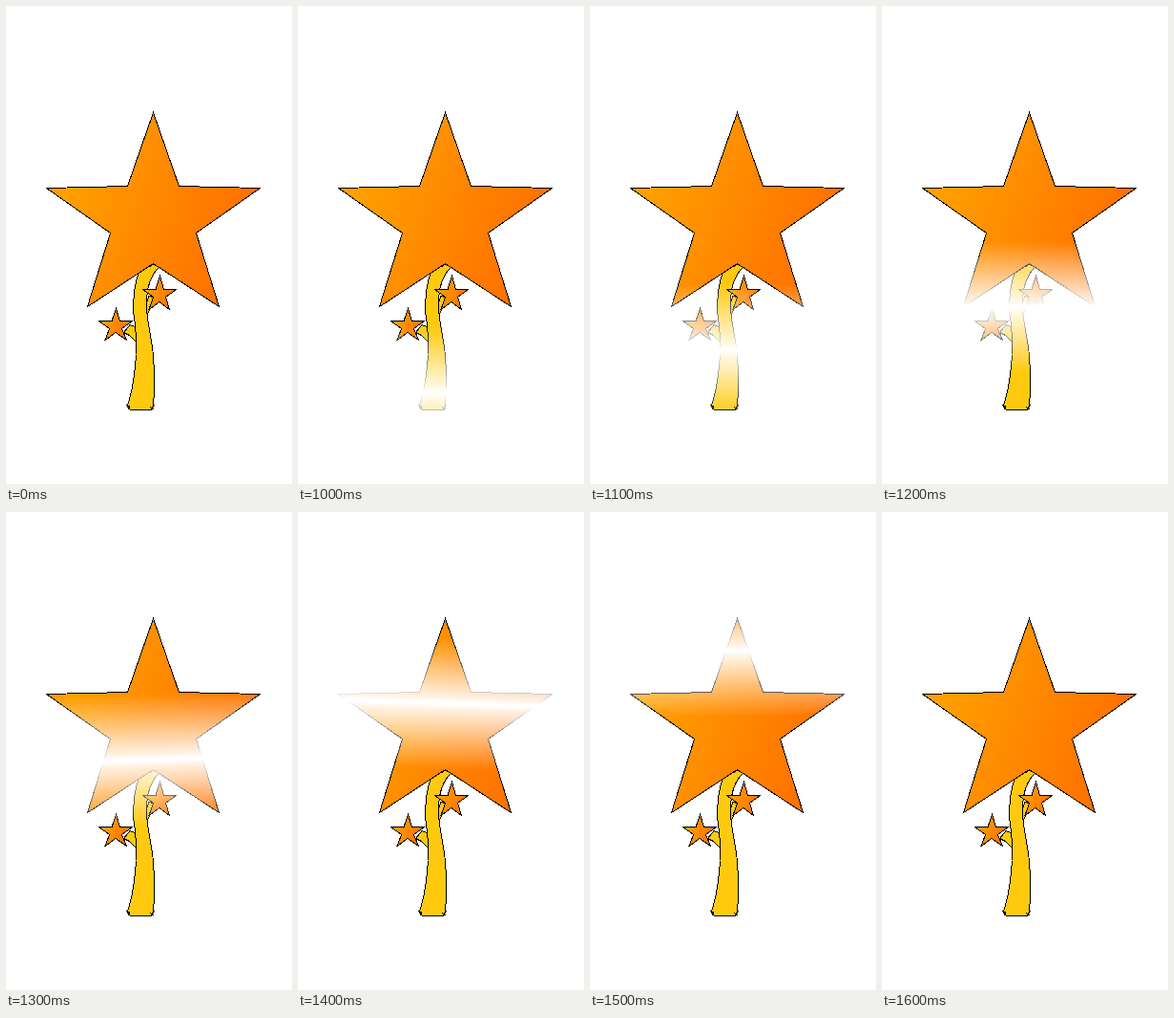
Animation, 300 px wide and 500 px high, one loop 1700 ms. Source, as an HTML page:

```html
<!DOCTYPE html>
<html lang="en">
<head>
<meta charset="utf-8">
<title>Star tree</title>
<style>
  html, body { margin: 0; width: 100%; height: 100%; overflow: hidden; background: #fff; }
  svg { display: block; width: 300px; height: 500px; }
  .ink { stroke: #000; stroke-width: 1; shape-rendering: crispEdges; }
</style>
</head>
<body>
<svg viewBox="0 0 300 500">
  <defs>
    <linearGradient id="orange" x1=".09" y1=".36" x2=".875" y2=".61">
      <stop offset="0" stop-color="#ffa000"/>
      <stop offset="1" stop-color="#ff7300"/>
    </linearGradient>
    <linearGradient id="shine" x1="0" y1="0" x2="0" y2="1">
      <stop offset="0" stop-color="#fff" stop-opacity="0"/>
      <stop offset=".46" stop-color="#fff" stop-opacity=".9"/>
      <stop offset=".49" stop-color="#fff"/>
      <stop offset=".51" stop-color="#fff"/>
      <stop offset=".54" stop-color="#fff" stop-opacity=".9"/>
      <stop offset="1" stop-color="#fff" stop-opacity="0"/>
    </linearGradient>
  </defs>

  <g class="ink" fill="#ffc90e">
    <path d="M138 336.500L130 333.500L123.500 341.500L129.500 344.500L137.500 352.500Z"/>
    <path d="M147.500 323.500L151 317L154.500 305L150 303L147.500 310Z"/>
    <path d="M154.500 268.500L139.500 278.500C134.500 291 133.500 306 133.500 319.500C136 335 137 352 136.500 364.500C135 386 132 405 127.500 417.500L130.500 422.500H152.500L154.500 418.500C156 399 156 384 154.500 366.500C153 347 148 332 147.500 315.500C147 298 150 283 160.500 273.500Z"/>
    <path fill="none" d="M126.500 417.500L130.500 422.500M128 422L130 418M151.500 419.500L154.500 422M152 422L155.500 417.500"/>
  </g>

  <g class="ink" fill="url(#orange)">
    <path d="M154.500 111.500L181.500 188.500L266.500 190.500L199.500 237.500L223.500 314.500L154.500 269.500L85.500 314.500L109.500 237.500L42.500 190.500L127.500 188.500Z"/>
    <path fill="none" d="M151 272.500L154.500 270L158.500 272.500"/>
    <path d="M161.500 282.500L165.500 296.500H178.500L167.500 304.500L171.500 317.500L161 309.500L150 317.500L154.500 304.500L143.500 296.500H157Z"/>
    <path d="M115.500 316.500L119.500 329.500H132.500L121.500 337.500L126.500 349.500L115 341.500L104 349.500L108.500 337.500L97.500 329.500H111Z"/>
  </g>

  <rect id="band" x="-20" y="-69" width="340" height="138" fill="url(#shine)"/>
</svg>
<script>
  const LOOP = 1700, REST = 1000, STEP = 100;
  // Height and tilt of the shine at each step of its climb.
  const poses = [[405, 0], [360, 0], [315, 0], [259, -2], [200, 2], [145, 0]];
  const band = document.getElementById('band');

  function draw(time) {
    const pose = poses[Math.floor((time % LOOP - REST) / STEP)];
    band.setAttribute('visibility', pose ? 'visible' : 'hidden');
    if (pose) {
      band.setAttribute('transform', `translate(0 ${pose[0]}) rotate(${pose[1]} 154 0)`);
    }
  }

  const start = performance.now();
  function tick() {
    draw(performance.now() - start);
    requestAnimationFrame(tick);
  }
  tick();
</script>
</body>
</html>
```
